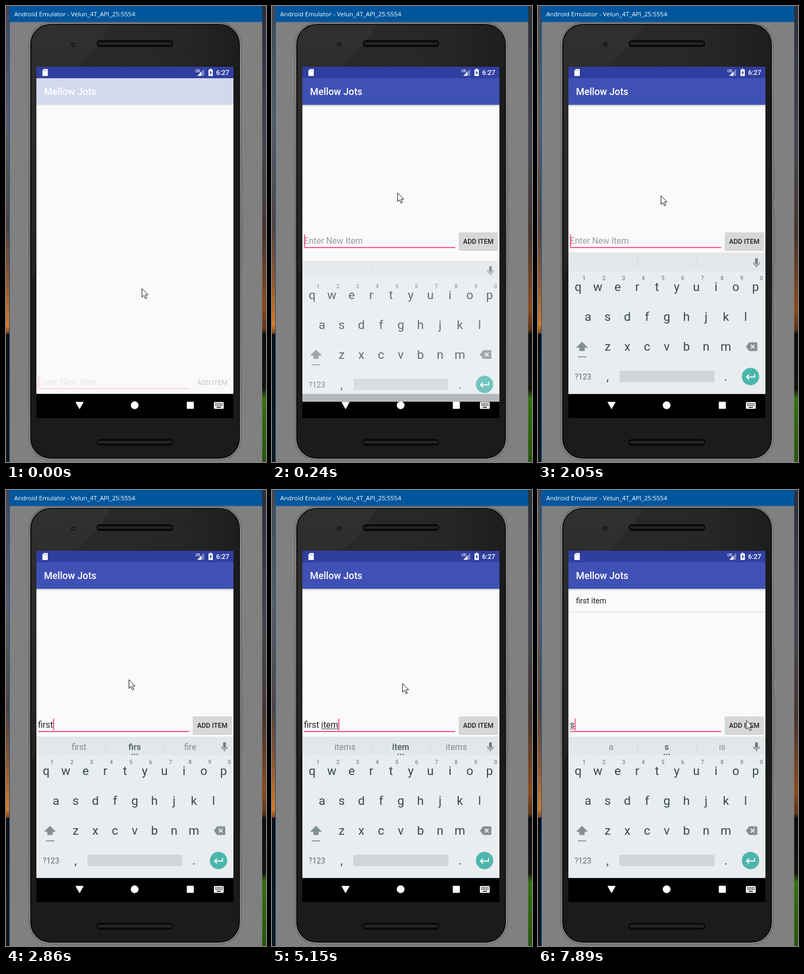
These frames come from a looping animation (479 by 840 pixels, 8000 ms). An HTML page:

```html
<!DOCTYPE html>
<html lang="en">
<head>
<meta charset="utf-8">
<title>Emulator</title>
<style>
  html, body { margin: 0; width: 100%; height: 100%; overflow: hidden; background: #808080; }
  svg { display: block; width: 100%; height: 100%; }
  text { font-family: Roboto, sans-serif; white-space: pre; }
  .mid { text-anchor: middle; }
  .med { font-weight: 500; }
</style>
</head>
<body>
<svg viewBox="0 0 479 840" preserveAspectRatio="none">
  <defs>
    <linearGradient id="deskL" x2="0" y2="1">
      <stop offset="0" stop-color="#434753"/><stop offset=".25" stop-color="#5a5c67"/>
      <stop offset=".48" stop-color="#51433f"/><stop offset=".6" stop-color="#94552a"/>
      <stop offset=".7" stop-color="#d77a22"/><stop offset=".717" stop-color="#8a4616"/>
      <stop offset=".72" stop-color="#0b0e12"/><stop offset="1" stop-color="#12171b"/>
    </linearGradient>
    <linearGradient id="deskR" x2="0" y2="1">
      <stop offset="0" stop-color="#2b2f38"/><stop offset=".3" stop-color="#42454f"/>
      <stop offset=".5" stop-color="#46352f"/><stop offset=".66" stop-color="#8a4a20"/>
      <stop offset=".71" stop-color="#5c3417"/><stop offset=".72" stop-color="#0b0d0e"/>
      <stop offset=".84" stop-color="#11150d"/><stop offset=".86" stop-color="#36700f"/>
      <stop offset="1" stop-color="#26550c"/>
    </linearGradient>
    <linearGradient id="rim" x2="0" y2="1">
      <stop offset="0" stop-color="#9a9a9a"/><stop offset=".1" stop-color="#b0b0b0"/>
      <stop offset=".5" stop-color="#8a8a8a"/><stop offset="1" stop-color="#a8a8a8"/>
    </linearGradient>
    <linearGradient id="gloss">
      <stop offset="0" stop-color="#292929"/><stop offset=".6" stop-color="#272727"/>
      <stop offset="1" stop-color="#1d1d1d"/>
    </linearGradient>
    <linearGradient id="glare" x2="0" y2="1">
      <stop offset="0" stop-color="#303030"/><stop offset="1" stop-color="#222"/>
    </linearGradient>
    <linearGradient id="shade" x2="0" y2="1">
      <stop offset="0" stop-opacity=".2"/><stop offset="1" stop-opacity="0"/>
    </linearGradient>
    <clipPath id="screen"><rect x="56" y="112" width="363" height="647"/></clipPath>
    <clipPath id="face"><rect x="47" y="35" width="382" height="797" rx="35"/></clipPath>
  </defs>

  <!-- desktop and window -->
  <rect width="479" height="840" fill="#808080"/>
  <rect width="6" height="840" fill="url(#deskL)"/>
  <rect x="472" width="7" height="840" fill="url(#deskR)"/>
  <path d="M6 0H472V29.500H7V840H6Z" fill="#00569d"/>
  <text x="15" y="19" font-size="11.5" fill="#fff" style="font-family:'Open Sans',sans-serif">Android Emulator - Velun_4T_API_25:5554</text>

  <!-- phone -->
  <g fill="#8c8c8c" stroke="#4a4a4a" stroke-width=".7">
    <rect x="432" y="296" width="3.800" height="50" rx="1"/>
    <rect x="432" y="377" width="3.800" height="100" rx="1"/>
  </g>
  <rect x="42" y="30.500" width="391.500" height="806" rx="40" fill="#484848"/>
  <rect x="43.700" y="32.200" width="388.100" height="802.600" rx="38.500" fill="#0e0e0e" stroke="url(#rim)" stroke-width="1.500"/>
  <rect x="47" y="35" width="382" height="797" rx="35" fill="#1b1b1b"/>
  <g clip-path="url(#face)">
    <path d="M194 34H430V112H129Q165 82 194 34Z" fill="url(#gloss)"/>
    <path d="M46 34H194Q165 82 129 112L56 480 46 505Z" fill="url(#glare)"/>
  </g>
  <circle cx="124" cy="71" r="4" fill="#151515"/><circle cx="124" cy="71" r="1.500" fill="#394048"/>
  <g id="speakers"></g>

  <g clip-path="url(#screen)">
    <rect x="56" y="112" width="363" height="647" fill="#fafafa"/>
    <g id="app">
      <rect x="56" y="182" width="363" height="4" fill="url(#shade)"/>
      <rect x="56" y="133" width="363" height="49" fill="#3f51b5"/>
      <g id="row">
        <text x="70" y="209" font-size="14.100" fill="#212121">first item</text>
        <rect x="56" y="224.500" width="363" height="1.200" fill="#dcdcdc"/>
      </g>
      <g id="form">
        <text id="hint" x="59" y="438" font-size="15.900" fill="#9b9b9b">Enter New Item</text>
        <text id="typed" x="59" y="438" font-size="15.900" fill="#212121"></text>
        <rect id="compose" x="59" y="439.500" height="1" fill="#333"/>
        <rect x="59" y="444" width="278.500" height="1.800" fill="#ff4081"/>
        <rect id="caret" y="421" width="1.700" height="22" fill="#ff4081"/>
        <g id="button">
          <rect x="344" y="417.500" width="72" height="33.500" rx="2" fill="#000" opacity=".1"/>
          <rect x="344.500" y="418" width="71" height="32.200" rx="2" fill="#000" opacity=".13"/>
          <rect x="344.500" y="417" width="71" height="32.500" rx="1.800"/>
        </g>
        <text x="380" y="438" class="mid med" font-size="12.360" fill="#212121">ADD ITEM</text>
      </g>
    </g>
    <text x="70" y="164" class="med" font-size="17.660" fill="#fff">Mellow Jots</text>

    <!-- status bar -->
    <rect x="56" y="112" width="363" height="21" fill="#303f9f"/>
    <path d="M70 116H76Q77 116 77 117V128Q77 129 76 129H68Q67 129 67 128V119Z" fill="#fff"/>
    <path d="M70.500 117.500V120M72.500 117.500V120M74.500 117.500V120" stroke="#303f9f" stroke-width=".5"/>
    <text x="349" y="122" class="med" font-size="6.500" letter-spacing="-.8" fill="#fff">LTE</text>
    <path d="M365 116V128.500H352.500Z" fill="#7d86c3"/>
    <path d="M360 121V128.500H352.500Z" fill="#fff"/>
    <path d="M375.500 115.500H378.500V117H381V129H373V117H375.500Z" fill="#fff"/>
    <path d="M377.800 118.500 374.800 123.500H376.800V127.500L379.400 122.300H377.800Z" fill="#303f9f"/>
    <text x="387" y="127" class="med" font-size="12.400" fill="#fff">6:27</text>

    <!-- navigation bar -->
    <rect x="56" y="714.500" width="363" height="45" fill="#000"/>
    <g fill="#fff">
      <path d="M129 730H142L135.500 741.500Z" stroke="#fff" stroke-width="1.500" stroke-linejoin="round"/>
      <circle cx="237" cy="735.500" r="7.200"/>
      <rect x="333" y="729" width="13" height="13" rx="1"/>
      <rect x="383" y="729.500" width="18" height="12.500" rx="1.500"/>
    </g>
    <path d="M385.500 732.700H399M385.500 735.700H399" stroke="#000" stroke-width="1.700" stroke-dasharray="1.700 1.200"/>
    <path d="M388 739.300H396" stroke="#000" stroke-width="1.600"/>

    <!-- soft keyboard -->
    <g id="board">
      <rect x="56" y="454.500" width="363" height="260" fill="#e9edf0"/>
      <rect x="56" y="454.500" width="363" height="34.500" fill="#e3e7ea"/>
      <path d="M183.500 461V484M291.500 461V484" stroke="#d2d7da"/>
      <path d="M56 489.500H419" stroke="#f0f3f5"/>
      <g fill="none" stroke="#717d83">
        <path d="M402.500 467V473" stroke-width="5.200" stroke-linecap="round"/>
        <path d="M397.200 472.500A5.300 5.300 0 0 0 407.800 472.500M402.500 478V481.500" stroke-width="1.600"/>
      </g>
      <g id="words" font-size="15.600" fill="#7f8a90"></g>
      <g id="keys" font-size="22.500" fill="#37474f"></g>
      <g fill="#859095">
        <path d="M81 618.500 92 629.500H86V635.500H76V629.500H70Z"/>
        <rect x="73.500" y="645.500" width="15.500" height="1.800"/>
        <path d="M389 619.500H402.500Q404 619.500 404 621V634Q404 635.500 402.500 635.500H389L383 627.500Z"/>
      </g>
      <path d="M392 624 399 631M399 624 392 631" stroke="#e9edf0" stroke-width="1.900"/>
      <text x="67.500" y="688" font-size="14.200" fill="#5b6a71">?123</text>
      <rect x="150" y="672" width="175" height="21" rx="2.500" fill="#d0d5d8"/>
      <circle cx="391.500" cy="682.500" r="16" fill="#4db6ac"/>
      <path d="M399 678V683.500H384.500M388.700 679 384.200 683.500 388.700 688" fill="none" stroke="#fff" stroke-width="1.800"/>
    </g>
  </g>

  <path id="mouse" d="M.5 .5V16.500L4.200 13 6.800 19.200 9.400 18 6.800 12H11.800Z" fill="#fff" stroke="#111"/>
</svg>

<script>
const LOOP = 8000;
const $ = id => document.getElementById(id);
const set = (el, attrs) => {
  for (const k in attrs) el.setAttribute(k, attrs[k]);
  return el;
};
const add = (parent, tag, attrs, text = '') => {
  const el = set(document.createElementNS('http://www.w3.org/2000/svg', tag), attrs);
  el.textContent = text;
  return parent.appendChild(el);
};

for (const y of [63, 797.5]) {
  add($('speakers'), 'rect', { x: 167, y, width: 141, height: 12.5, rx: 6.2, fill: '#080808' });
  add($('speakers'), 'rect', { x: 169.5, y: y + 3.5, width: 136, height: 5, rx: 2.5, fill: '#242424' });
}

const PITCH = 36.3;
const keyRow = (chars, x, y) => [...chars].forEach((c, i) =>
  add($('keys'), 'text', { x: x + i * PITCH, y, class: 'mid' }, c));
keyRow('qwertyuiop', 74, 525);
keyRow('asdfghjkl', 92, 580);
keyRow('zxcvbnm', 128.3, 635);
keyRow(',', 128.3, 690);
keyRow('.', 346, 690);
[...'1234567890'].forEach((c, i) =>
  add($('keys'), 'text', { x: 85 + i * PITCH, y: 505, class: 'mid med', 'font-size': 10.2, fill: '#7b888e' }, c));

const words = [134.5, 237, 339.5].map((x, i) =>
  add($('words'), 'text', { x, y: 479, class: 'mid', ...(i === 1 && { 'font-weight': 700, fill: '#5c6a71' }) }));
const dots = add($('words'), 'g', { fill: '#5c6a71' });
for (const x of [232.5, 237, 241.5]) add(dots, 'circle', { cx: x, cy: 487, r: 1.3 });

// Tracks hold each value until the next time.
const typing = [[0, ''], [2170, 'f'], [2440, 'fi'], [2580, 'fir'], [2720, 'firs'], [2860, 'first'],
  [3440, 'first '], [3930, 'first i'], [4200, 'first it'], [4350, 'first ite'], [4490, 'first item'],
  [5830, ''], [7740, 's']];
const hints = [[0, ''], [2310, 'for f of'], [2580, 'first fi fit'], [2720, 'for fir first'],
  [2860, 'first firs fire'], [3010, 'forest first fist'], [3560, ''], [4070, 'in i is'], [4200, ''],
  [4620, 'items item items'], [5830, ''], [7890, 'a s is']];
const blink = [[0, 1], [480, 0], [930, 1], [1520, 0], [2050, 1], [6470, 0], [6970, 1], [7370, 0], [7740, 1]];
const pointer = [[0, [250, 520]], [120, [242, 420]], [240, [231, 344]], [600, [228, 347]], [720, [226, 349]],
  [5150, [240, 356]], [5290, [300, 385]], [5420, [365, 415]], [5550, [383.5, 424]]];
const press = [[0, '#d6d7d7'], [5690, '#c8c9c9'], [5830, '#bfc0c0'], [6230, '#cbcccc'], [6470, '#d6d7d7']];
const fade = [[0, .2], [120, 1]];
const drop = [[0, 260], [240, 0]];
const board = [[0, [15, 0]], [240, [14.5, .78]], [360, [0, 1]]];

const at = (track, t) => track.reduce((v, [start, value]) => start <= t ? value : v, track[0][1]);

function draw(t) {
  const text = at(typing, t), picks = at(hints, t).split(' ');
  $('typed').textContent = text;
  const width = text ? $('typed').getComputedTextLength() : 0;
  const last = text.split(' ').pop();
  const composing = last && picks[1] === last;
  set($('hint'), { opacity: text ? 0 : 1 });
  set($('caret'), { x: 59.3 + width, opacity: at(blink, t) });

  let start = 0;
  if (composing && text !== last) start = $('typed').getSubStringLength(0, text.length - last.length);
  set($('compose'), { x: 59 + start, width: width - start, opacity: composing ? 1 : 0 });
  words.forEach((w, i) => { w.textContent = picks[i] || ''; });
  set(dots, { opacity: picks[1] ? 1 : 0 });

  const alpha = at(fade, t);
  set($('app'), { opacity: alpha });
  set($('form'), { transform: `translate(0 ${at(drop, t)})` });
  set($('row'), { opacity: t >= 5830 ? 1 : 0 });
  set($('button'), { fill: at(press, t), opacity: alpha ** 2 });
  const [dy, solid] = at(board, t);
  set($('board'), { transform: `translate(0 ${dy})`, opacity: solid });
  set($('mouse'), { transform: `translate(${at(pointer, t)})` });
}

const begin = performance.now();
function tick(now) {
  draw(Math.max(0, now - begin) % LOOP);
  requestAnimationFrame(tick);
}
draw(0);
requestAnimationFrame(tick);
</script>
</body>
</html>
```
